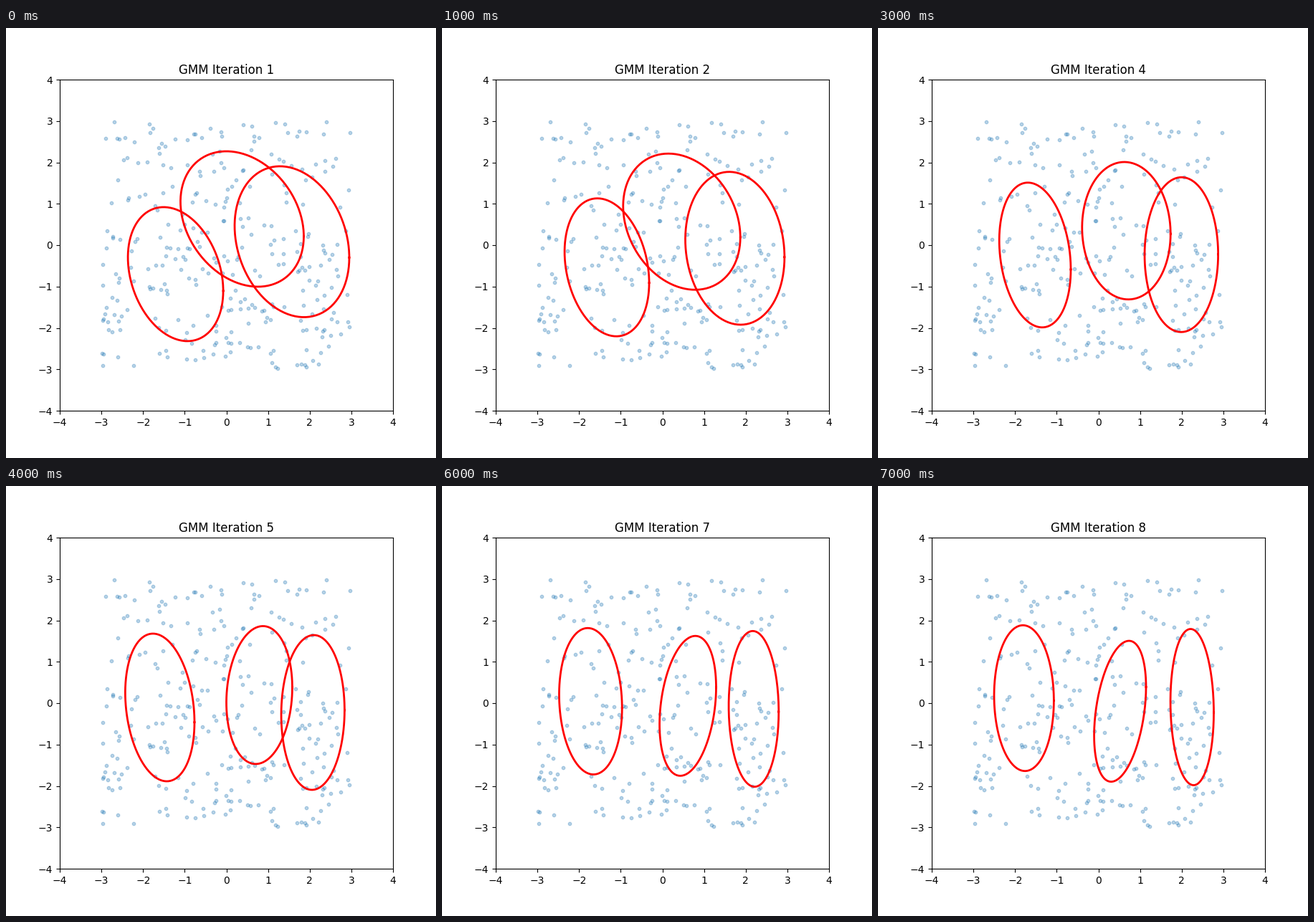
A matplotlib script that plays this animation: 600 by 600 pixels, repeating every 8000 ms.

```python
import numpy as np
import matplotlib.pyplot as plt
from matplotlib.animation import FuncAnimation

STEPS = 8
LIMIT = 4
SPREAD = 2.98

# Each component drifts through four poses:
# centre x, centre y, half width, half height, correlation
POSE_STEPS = (1, 3, 5, 8)
COMPONENTS = [
    [(-1.22, -0.70, 1.144, 1.619, -0.25), (-1.445, -0.372, 0.886, 1.714, -0.2),
     (-1.597, -0.104, 0.831, 1.784, -0.2), (-1.786, 0.121, 0.717, 1.761, -0.035)],
    [(0.378, 0.632, 1.48, 1.636, -0.256), (0.551, 0.502, 1.333, 1.654, -0.2),
     (0.791, 0.196, 0.791, 1.666, 0.11), (0.521, -0.196, 0.623, 1.702, 0.345)],
    [(1.574, 0.083, 1.376, 1.823, -0.21), (1.908, -0.234, 1.005, 1.87, -0.02),
     (2.077, -0.225, 0.76, 1.87, 0.03), (2.25, -0.095, 0.52, 1.887, -0.07)],
]

ANGLES = np.linspace(0, 2 * np.pi, 200)


def pose_at(poses, step):
    return [np.interp(step, POSE_STEPS, values) for values in zip(*poses)]


def outline(cx, cy, width, height, corr):
    # The correlation sets the phase lag between the axes, which tilts the ellipse
    lag = np.arccos(corr)
    return (cx + width * np.cos(ANGLES),
            cy + height * np.cos(ANGLES + lag) * 1.0)


def tilted(pose):
    # A negative correlation means the rightmost point sits below the centre
    return outline(*pose)


rng = np.random.default_rng(5)
points = rng.uniform(-SPREAD, SPREAD, (300, 2))

fig, ax = plt.subplots(figsize=(6, 6), dpi=100)
ax.scatter(*points.T, s=10, alpha=0.3)
curves = [ax.plot([], [], color="red", lw=2)[0] for _ in COMPONENTS]
ax.set_xlim(-LIMIT, LIMIT)
ax.set_ylim(-LIMIT, LIMIT)
title = ax.set_title("")


def update(i):
    step = i + 1
    for curve, poses in zip(curves, COMPONENTS):
        curve.set_data(*tilted(pose_at(poses, step)))
    title.set_text(f"GMM Iteration {step}")
    return [*curves, title]


anim = FuncAnimation(fig, update, frames=STEPS, interval=1000,
                     repeat=True, repeat_delay=0)
plt.show()
```
